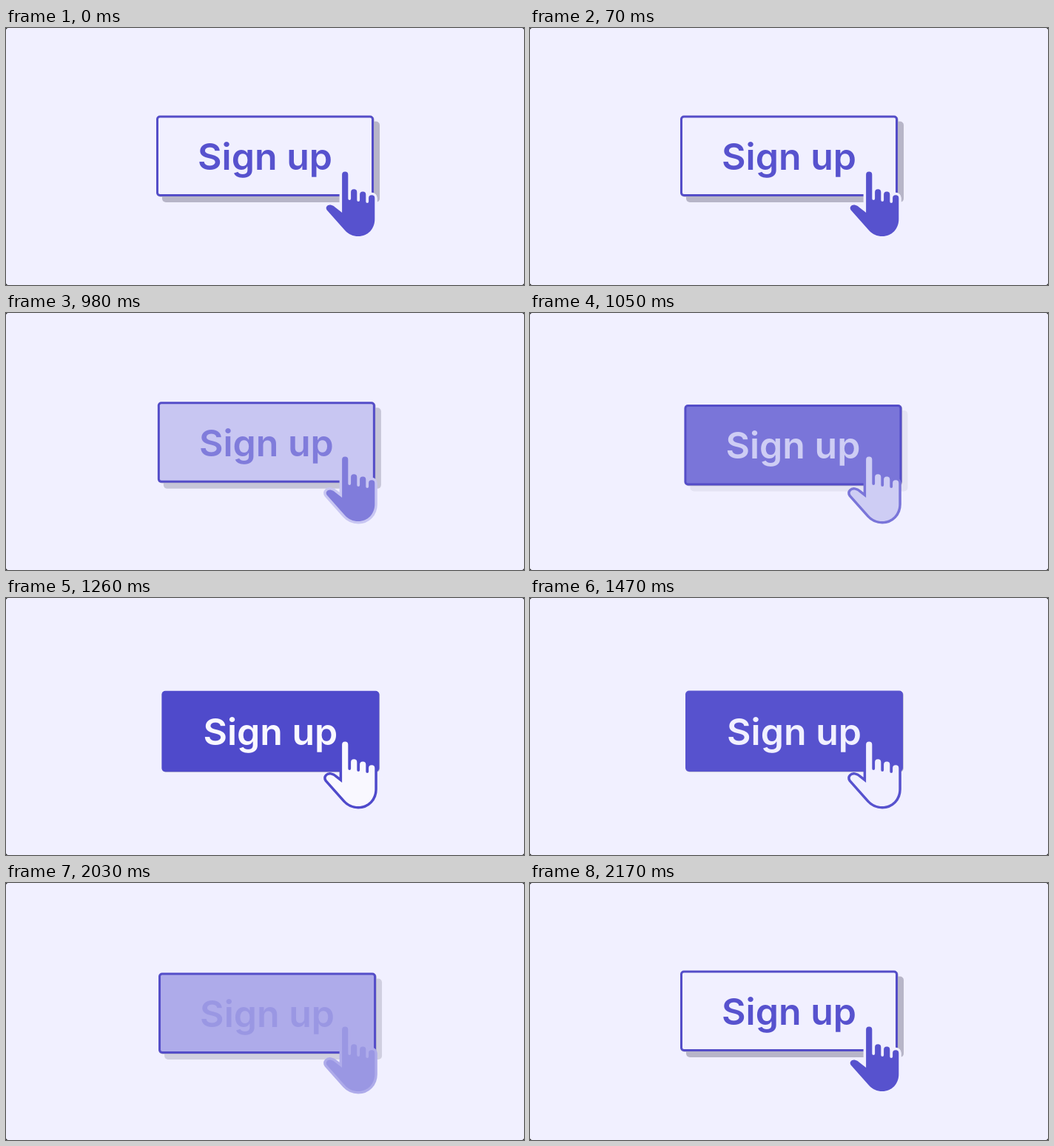
These frames come from a looping animation (700x348 px, 2380 ms). An HTML page with a canvas:

```html
<!DOCTYPE html>
<html lang="en">
<head>
<meta charset="utf-8">
<title>Sign up button</title>
<style>
  html, body { margin: 0; width: 100%; height: 100%; overflow: hidden; background: #000; }
  canvas { display: block; width: 700px; height: 348px; }
</style>
</head>
<body>
<canvas id="stage" width="700" height="348"></canvas>
<script>
const ctx = document.getElementById('stage').getContext('2d');

const LOOP = 2380, STEP = 70;
const PRESS = 923, SETTLED = 1470, RELEASE = 1962, RELEASE_TIME = 200;
const TRAVEL = 7;
const PALE = [241, 240, 255], ACCENT = [87, 82, 206], SHADE = [183, 181, 200];
const BORDER = '#544dc8';
const BOX = { x: 203, y: 118.5, w: 294, h: 109.5, r: 5 };

const rgb = c => `rgb(${c.join(',')})`;
const mix = (a, b, k) =>
  rgb(a.map((v, i) => Math.max(0, Math.min(255, Math.round(v + (b[i] - v) * k)))));

// Underdamped spring from 0 to 1, t in seconds
function spring(t) {
  const decay = 9, freq = 12.5;
  return 1 - Math.exp(-decay * t) * (Math.cos(freq * t) + decay / freq * Math.sin(freq * t));
}

// How far the button is pressed: 0 at rest, 1 when down
function pressed(t) {
  if (t < PRESS) return 0;
  if (t < SETTLED) return spring((t - PRESS) / 1000);
  if (t < RELEASE) return 1;
  const left = Math.max(0, 1 - (t - RELEASE) / RELEASE_TIME);
  return left * left;
}

function roundRect(x, y, w, h, r, fill) {
  ctx.beginPath();
  ctx.roundRect(x, y, w, h, r);
  ctx.fillStyle = fill;
  ctx.fill();
}

function makeHand() {
  const p = new Path2D();
  const r = 4.1;
  const tops = [[458.2, 198.6], [470.2, 222.3], [482.2, 225.5], [494.2, 230.3]];
  const gaps = [231, 233, 235];
  p.moveTo(454.1, 250);
  tops.forEach(([x, y], i) => {
    p.lineTo(x - r, y);
    p.arc(x, y, r, Math.PI, 0);
    if (i < gaps.length) {
      p.lineTo(x + r, gaps[i]);
      p.arc(x + 6, gaps[i], 6 - r, Math.PI, 0, true);
    }
  });
  p.lineTo(498.3, 259);
  p.bezierCurveTo(498.3, 272, 489, 282, 476, 282);
  p.bezierCurveTo(469, 282, 463, 279.5, 458, 274);
  p.lineTo(433.6, 246.4);
  p.bezierCurveTo(430.8, 242.6, 435, 238.6, 439.4, 239.8);
  p.bezierCurveTo(441.5, 240.3, 443, 241.2, 444.5, 242.6);
  p.closePath();
  return p;
}
const hand = makeHand();

function draw(t) {
  const k = pressed(t);
  const back = mix(PALE, ACCENT, k);
  const front = mix(ACCENT, PALE, k);
  const { x, y, w, h, r } = BOX;

  ctx.fillStyle = '#000';
  ctx.fillRect(0, 0, 700, 348);
  roundRect(0, 0, 700, 348, 3, rgb(PALE));

  ctx.save();
  ctx.translate(TRAVEL * k, TRAVEL * k);
  roundRect(x + 8, y + 8, w, h, r, mix(SHADE, PALE, Math.min(1, k)));
  roundRect(x + 0.7, y + 0.7, w, h, r, rgb(SHADE));
  roundRect(x, y, w, h, r, k > 0.95 ? back : BORDER);
  roundRect(x + 3, y + 3, w - 6, h - 6, r - 3, back);
  ctx.fillStyle = front;
  ctx.font = '600 50px Inter, sans-serif';
  ctx.textAlign = 'center';
  ctx.textBaseline = 'alphabetic';
  ctx.fillText('Sign up', 350, 192);
  ctx.restore();

  ctx.lineJoin = 'round';
  ctx.lineWidth = 7;
  ctx.strokeStyle = back;
  ctx.stroke(hand);
  ctx.fillStyle = front;
  ctx.fill(hand);
}

const start = performance.now();
function tick() {
  const t = (performance.now() - start) % LOOP;
  draw(Math.floor(t / STEP) * STEP);
  requestAnimationFrame(tick);
}
tick();
</script>
</body>
</html>
```
